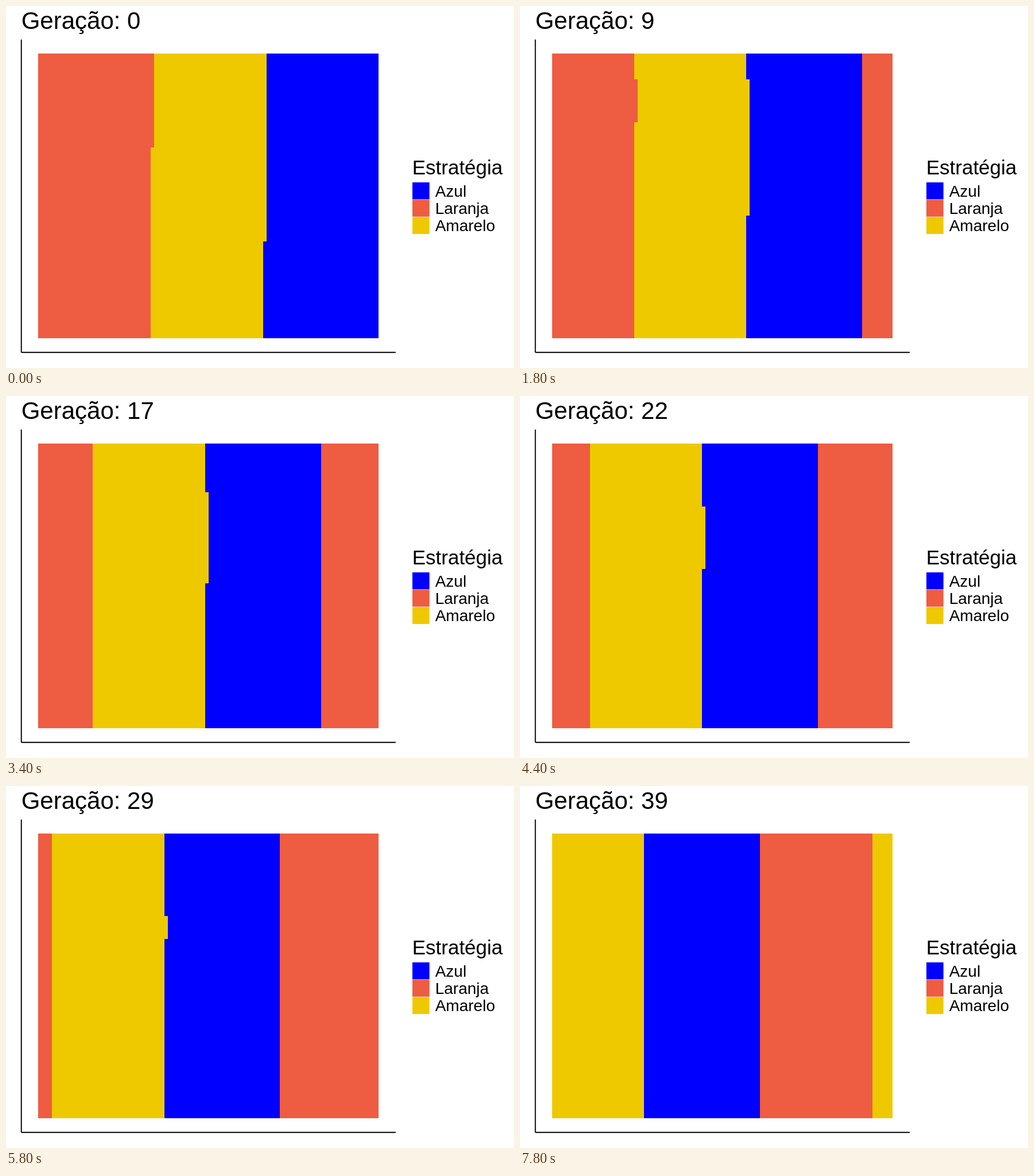
Animation of 885x632 px, one loop 8 s. Source, as an HTML page:

```html
<!DOCTYPE html>
<html lang="pt">
<head>
<meta charset="utf-8">
<title>Geração</title>
<style>
  html, body { margin: 0; width: 100%; height: 100%; overflow: hidden; background: #fff; }
  svg { display: block; width: 885px; height: 632px; }
  text { font-family: "Liberation Sans", Arial, sans-serif; fill: #000; }
</style>
</head>
<body>
<svg viewBox="0 0 885 632">
  <text id="title" x="26.7" y="40.3" font-size="42"></text>
  <g id="field" shape-rendering="crispEdges"></g>
  <path d="M26.7 58.6V604.8M26.7 604.8H678.9" fill="none" stroke="#000" stroke-width="1.9"/>
  <text x="707.7" y="294.3" font-size="35">Estratégia</text>
  <g id="legend" font-size="28"></g>
</svg>
<script>
const STEP = 200, GENERATIONS = 40, SIZE = 100;
const BLUE = '#0000ff', ORANGE = '#ee5c42', YELLOW = '#eec900';

const $ = id => document.getElementById(id);
const px = col => Math.round(56.4 + col * 5.929);
const py = row => Math.round(83.4 + row * 4.966);

function add(parent, tag, attrs, text = '') {
  const el = document.createElementNS('http://www.w3.org/2000/svg', tag);
  for (const k in attrs) el.setAttribute(k, attrs[k]);
  el.textContent = text;
  return parent.appendChild(el);
}

[['Azul', BLUE], ['Laranja', ORANGE], ['Amarelo', YELLOW]].forEach(([name, fill], i) => {
  const y = 322.7 + i * 30.3;
  add($('legend'), 'rect', { x: 708, y: y - 14.8, width: 29.7, height: 29.6, fill });
  add($('legend'), 'text', { x: 747.7, y: y + 10 }, name);
});

const layers = [ORANGE, YELLOW, BLUE, ORANGE, YELLOW]
  .map(fill => add($('field'), 'path', { fill }));

// Area right of column `col`; rows from..to start one column later.
function region(col, from, to) {
  const c = Math.max(0, col);
  if (c >= SIZE) return '';
  const notch = from < to
    ? `V${py(to)}H${px(c + 1)}V${py(from)}H${px(c)}` : '';
  return `M${px(c)} ${py(0)}H${px(SIZE)}V${py(SIZE)}H${px(c)}${notch}Z`;
}

// Every front advances one column per generation, and its step shrinks by a row at each end.
function draw(gen) {
  $('title').textContent = 'Geração: ' + gen;
  const shapes = [
    region(0),
    region(33 - gen, gen, 33 - gen),
    region(66 - gen, gen, 66 - gen),
    region(100 - gen),
    region(133 - gen)
  ];
  shapes.forEach((d, i) => layers[i].setAttribute('d', d));
}

let shown = -1;
function tick() {
  const gen = Math.floor(performance.now() / STEP) % GENERATIONS;
  if (gen !== shown) draw(shown = gen);
  requestAnimationFrame(tick);
}
tick();
</script>
</body>
</html>
```
